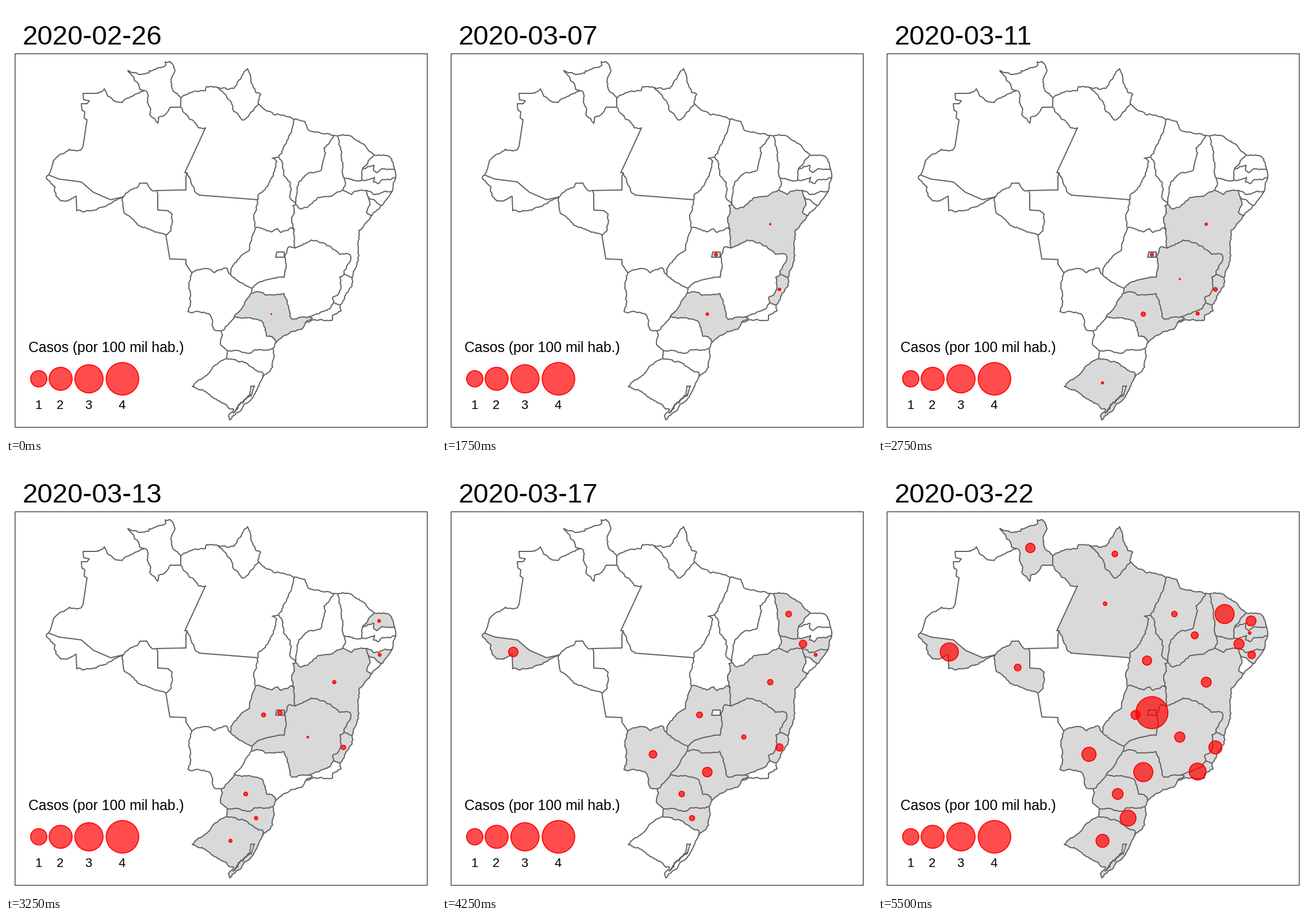
Write a matplotlib script that moves like this. It is 748 by 748 pixels and loops after 8.5 s.

```python
import math
import random

import matplotlib.pyplot as plt
import numpy as np
from matplotlib.animation import FuncAnimation
from matplotlib.collections import LineCollection
from matplotlib.patches import Circle, Polygon, Rectangle

SIZE, DPI = 748, 64
PT = 72 / DPI                # points per pixel
STEP_MS, FRAMES = 250, 34
LAST_DAY = 22
UNIT_RADIUS = 14.15          # bubble radius for one case per 100 thousand
GREY, LINE = "#d9d9d9", "#636363"
BUBBLE = dict(facecolor=(1, 0, 0, 0.7), edgecolor="red", linewidth=1.7 * PT)

fig = plt.figure(figsize=(SIZE / DPI, SIZE / DPI), dpi=DPI, facecolor="white")
ax = fig.add_axes([0, 0, 1, 1])
ax.set_xlim(0, SIZE)
ax.set_ylim(SIZE, 0)
ax.axis("off")

borders = []
states = []


def jagged(a, b, rng):
    """Fractal path from a (excluded) to b."""
    length = math.dist(a, b)
    if length < 4:
        return [b]
    off = 0.42 * rng.uniform(-1, 1) / math.sqrt(length)
    mid = ((a[0] + b[0]) / 2 - off * (b[1] - a[1]),
           (a[1] + b[1]) / 2 + off * (b[0] - a[0]))
    return jagged(a, mid, rng) + jagged(mid, b, rng)


def straight(owners, *points):
    """Border shared by the given states (one owner: outer border)."""
    borders.append((owners.split(), list(points)))


def rough(owners, *points):
    """Like straight, with a natural, jagged course between the points."""
    rng = random.Random(len(borders))
    path = [points[0]]
    for a, b in zip(points, points[1:]):
        path += jagged(a, b, rng)
    straight(owners, *path)


def ring(code):
    """Chain all borders of a state into one closed outline."""
    parts = [path for owners, path in borders if code in owners]
    outline = list(parts.pop(0))
    while parts:
        end = outline[-1]
        i = next(i for i, p in enumerate(parts) if end in (p[0], p[-1]))
        path = parts.pop(i)
        outline += path[1:] if path[0] == end else path[-2::-1]
    return outline


def radius(rate):
    return UNIT_RADIUS * math.sqrt(rate)


def state(code, center, millions, counts, gaps=()):
    """Cases grow exponentially between the given {day: count} points;
    nothing is reported before the first point or on gap days."""
    area = Polygon(ring(code), facecolor="white", edgecolor="none",
                   zorder=2 if code == "DF" else 1)
    bubble = Circle(center, 1, zorder=5, **BUBBLE)
    ax.add_patch(area)
    ax.add_patch(bubble)
    days = list(counts)
    logs = np.log(list(counts.values()))

    def cases(day):
        if day < days[0] or day in gaps:
            return 0
        return round(math.exp(np.interp(day, days, logs)))

    states.append((area, bubble, millions, cases))


def label(x, y, text, size, **kw):
    return ax.text(x, y, text, fontsize=size * PT, family="Liberation Sans",
                   va="baseline", **kw)


# North
rough("AM", (74, 294), (82, 270), (93, 259), (110, 249), (131, 250),
      (134, 244))
straight("AM", (134, 244), (141, 198), (136, 195), (137, 184), (132, 181),
         (131, 170), (141, 170), (145, 165), (135, 163), (134, 152),
         (157, 152))
rough("AM", (157, 152), (171, 144), (177, 157), (194, 167), (202, 168),
      (222, 156), (240, 147))
rough("RR", (240, 147), (232, 144), (231, 136), (219, 121), (212, 112),
      (235, 119), (248, 117), (249, 113), (278, 103), (277, 97), (286, 97),
      (294, 112), (288, 125), (290, 146), (304, 160))
rough("AM RR", (240, 147), (245, 149), (246, 168), (251, 177), (250, 188),
      (264, 204), (265, 194), (278, 188), (286, 176))
straight("AM RR", (286, 176), (304, 176))
straight("RR PA", (304, 160), (304, 176))
rough("PA", (304, 160), (321, 151), (347, 147), (349, 140), (368, 142))
rough("AP", (368, 142), (386, 145), (397, 143), (407, 128), (420, 109),
      (426, 128), (434, 150), (443, 153), (439, 170))
rough("AP PA", (439, 170), (425, 186), (416, 197), (410, 198), (403, 187),
      (396, 183), (394, 173), (382, 154), (368, 142))
rough("PA", (439, 170), (450, 180), (465, 188), (482, 190), (502, 197))
rough("PA MA", (502, 197), (495, 222), (482, 247), (480, 256), (474, 263))
rough("PA TO", (474, 263), (463, 265), (471, 270), (466, 289), (459, 306),
      (447, 322), (441, 326), (438, 337))
rough("PA MT", (315, 290), (321, 306), (328, 322), (336, 329))
straight("PA MT", (336, 329), (375, 332), (438, 337))
rough("AM PA", (304, 176), (313, 188), (335, 212), (347, 212))
straight("AM PA", (347, 212), (330, 249), (311, 290), (315, 290))
straight("AM MT", (315, 290), (313, 297), (313, 320), (262, 321))
rough("AM RO", (262, 321), (254, 321), (245, 308), (233, 308), (228, 316),
      (214, 322), (204, 332))
straight("AM AC", (74, 294), (92, 301), (131, 306), (152, 324), (182, 337),
         (204, 332))
rough("AC", (74, 294), (70, 298), (85, 314), (84, 322), (95, 339),
      (112, 337), (122, 331))
straight("AC", (122, 331), (123, 356))
rough("AC", (123, 356), (150, 356), (170, 349), (188, 339), (204, 332))
rough("RO", (204, 332), (206, 361), (229, 381), (249, 388), (278, 398))
straight("RO MT", (262, 321), (264, 327), (264, 355), (282, 356))
rough("RO MT", (282, 356), (289, 362), (287, 391), (278, 398))
rough("TO MA", (474, 263), (480, 270), (483, 292), (494, 306), (494, 334),
      (504, 345))

# Centre
straight("MT", (278, 398), (285, 440), (313, 441), (313, 449), (323, 464))
rough("MT MS", (323, 464), (352, 457), (363, 464), (384, 456), (391, 467))
rough("MT GO", (391, 467), (391, 458), (403, 441), (424, 424), (424, 414),
      (434, 386))
rough("MT TO", (434, 386), (431, 363), (438, 337))
rough("GO TO", (434, 386), (447, 388), (461, 393), (473, 388), (478, 394),
      (497, 386), (501, 391))
rough("TO BA", (504, 345), (499, 347), (502, 360), (497, 367), (501, 391))
rough("GO BA", (501, 391), (503, 421))
rough("GO MG", (503, 421), (492, 419), (488, 430), (485, 437), (487, 456),
      (484, 472), (441, 480), (428, 491))
straight("DF", (471, 428), (484, 428), (484, 437), (469, 437), (471, 428))
rough("GO MS", (391, 467), (404, 479), (428, 491))
straight("MS MG", (428, 491), (427, 499))
rough("MS SP", (427, 499), (415, 517), (397, 541))
rough("MS PR", (397, 541), (374, 565))
rough("MS", (323, 464), (318, 489), (321, 500), (317, 532), (352, 535),
      (357, 541), (361, 562), (374, 565))

# Northeast
rough("MA", (502, 197), (520, 201), (525, 215), (551, 222), (570, 225))
straight("PI", (570, 225), (577, 226))
rough("CE", (577, 226), (595, 225), (614, 235), (640, 259))
rough("RN", (640, 259), (667, 262), (676, 284))
straight("PB", (676, 284), (678, 292), (678, 299))
rough("PE", (678, 299), (672, 322))
rough("AL", (672, 322), (653, 347))
rough("SE", (653, 347), (637, 364))
rough("MA PI", (570, 225), (553, 247), (556, 256), (548, 286), (528, 290),
      (510, 305), (506, 316), (504, 345))
rough("PI CE", (577, 226), (582, 250), (588, 299))
rough("PI PE", (588, 299), (590, 312), (586, 320))
rough("CE PE", (588, 299), (620, 303))
rough("CE PB", (620, 284), (620, 303))
rough("CE RN", (640, 259), (629, 274), (620, 284))
rough("RN PB", (620, 284), (640, 277), (639, 284), (645, 290), (654, 283),
      (676, 284))
rough("PB PE", (620, 303), (630, 302), (641, 298), (639, 306), (648, 309),
      (655, 302), (678, 299))
rough("PE AL", (626, 321), (642, 328), (660, 322), (672, 322))
rough("AL BA", (626, 321), (630, 332))
rough("AL SE", (630, 332), (653, 347))
rough("SE BA", (630, 332), (633, 346), (627, 359), (637, 364))
rough("PE BA", (586, 320), (601, 328), (607, 322), (626, 321))
rough("PI BA", (504, 345), (514, 353), (526, 349), (543, 333), (566, 331),
      (586, 320))
rough("BA", (637, 364), (614, 391), (613, 420), (610, 452), (602, 472))

# Southeast
rough("MG BA", (503, 421), (531, 407), (550, 412), (580, 432), (598, 432),
      (600, 439), (593, 452), (588, 467))
rough("BA ES", (588, 467), (602, 472))
rough("MG ES", (588, 467), (581, 471), (583, 488), (577, 503), (569, 506),
      (570, 515))
rough("ES", (602, 472), (602, 487), (589, 505), (581, 520))
rough("ES RJ", (570, 515), (581, 520))
rough("MG RJ", (570, 515), (563, 527), (545, 535), (526, 541))
rough("RJ", (581, 520), (583, 530), (568, 538), (567, 547), (548, 545),
      (521, 551))
rough("RJ SP", (526, 541), (533, 543), (521, 551))
rough("SP MG", (427, 499), (446, 498), (453, 503), (483, 500), (489, 516),
      (494, 538), (498, 545), (526, 541))
rough("SP", (521, 551), (515, 562), (496, 566), (470, 585))

# South
rough("SP PR", (397, 541), (421, 542), (445, 548), (453, 574), (463, 575),
      (470, 585))
rough("PR", (374, 565), (376, 574), (373, 588), (385, 600))
rough("PR", (470, 585), (464, 596))
rough("PR SC", (385, 600), (400, 599), (424, 604), (434, 598), (464, 596))
straight("SC", (385, 600), (384, 613))
rough("SC", (464, 596), (464, 628), (446, 647))
rough("SC RS", (384, 613), (416, 620), (433, 633), (446, 637), (446, 647))
rough("RS", (384, 613), (371, 619), (339, 650), (324, 662), (341, 667),
      (362, 683), (380, 692), (388, 700), (396, 702), (387, 713), (389, 720),
      (405, 706), (423, 688), (440, 660), (446, 647))
rough("lagoon", (432, 661), (426, 661), (425, 676), (411, 691), (427, 678),
      (432, 661))
rough("lake", (409, 689), (395, 708), (403, 701), (409, 689))

ax.add_collection(LineCollection([path for _, path in borders], colors=LINE,
                                 linewidths=2 * PT, capstyle="round",
                                 joinstyle="round", zorder=4))
for name in ("lagoon", "lake"):
    ax.add_patch(Polygon(ring(name), facecolor="white", edgecolor="none",
                         zorder=3))

# Bubble centre, population in millions, growth, days without a report
state("SP", (461.5, 536), 45.92, {0: 1, 5: 6, 22: 631}, gaps=(13,))
state("RJ", (556, 535), 17.26, {5: 1, 22: 186},
      gaps=(7, 9, 10, 13, 14, 15, 17, 20))
state("ES", (587, 493), 4.02, {5: 1, 9: 1, 17: 8, 22: 26})
state("BA", (571, 379.5), 14.87, {6: 1, 22: 55}, gaps=(8,))
state("DF", (476.5, 432.5), 3.015, {7: 1, 10: 1, 13: 2, 20: 87, 22: 117},
      gaps=(17,))
state("MG", (525, 475), 21.17, {8: 1, 12: 1, 17: 14, 22: 83})
state("AL", (650, 332), 3.34, {8: 1, 17: 1, 20: 6, 22: 7}, gaps=(11,))
state("RS", (390.5, 655.5), 11.38, {10: 1, 13: 4, 20: 37, 22: 72},
      gaps=(14, 15, 17))
state("GO", (448, 436.5), 7.02, {12: 3, 20: 18, 22: 21})
state("PR", (417, 574), 11.43, {12: 6, 14: 6, 22: 50})
state("SC", (435, 616), 7.16, {12: 2, 15: 7, 17: 7, 20: 40, 22: 68})
state("PE", (628, 313), 9.557, {12: 2, 16: 18, 22: 37}, gaps=(13, 14, 15))
state("RN", (649, 273), 3.507, {13: 1, 18: 1, 20: 6, 22: 13},
      gaps=(14, 15, 17, 19))
state("MS", (367, 505), 2.78, {14: 2, 17: 6, 22: 21})
state("CE", (603, 261), 9.13, {15: 3, 17: 11, 20: 68, 22: 125})
state("SE", (637.5, 349), 2.30, {15: 1, 21: 10}, gaps=(17, 22))
state("AC", (124, 327), 0.882, {17: 3, 18: 3, 21: 11})
state("PB", (646.5, 294), 4.018, {18: 1})
state("TO", (468, 342), 1.573, {18: 1, 20: 1, 22: 5})
state("PA", (395, 243), 8.60, {18: 1, 22: 4}, gaps=(20,))
state("PI", (551, 298), 3.273, {19: 3, 20: 4, 22: 6})
state("AP", (412, 156.5), 0.846, {20: 1})
state("MA", (515.5, 261), 7.075, {20: 1, 22: 8})
state("RO", (243, 354), 1.777, {20: 1, 21: 3})
state("MT", (350, 387), 3.484, {20: 1, 21: 2}, gaps=(22,))
state("RR", (265, 146), 0.606, {21: 2})

# Frame and legend
ax.add_patch(Rectangle((15.8, 83.1), 717, 649.8, fill=False, snap=False,
                       edgecolor="#1a1a1a", linewidth=1.2 * PT))
label(39, 602, "Casos (por 100 mil hab.)", 24.7)
for value, x in zip((1, 2, 3, 4), (57, 95, 144.3, 202.6)):
    ax.add_patch(Circle((x, 648.5), radius(value), **BUBBLE))
    label(x - 0.7, 701, str(value), 22, ha="center")
title = label(28.4, 67, "", 47.4)


def date(day):
    early = ("02-26", "02-28", "02-29", "03-01", "03-04")
    return "2020-" + (early[day] if day < len(early) else f"03-{day:02d}")


def update(frame):
    day = min(frame, LAST_DAY)
    title.set_text(date(day))
    for area, bubble, millions, cases in states:
        count = cases(day)
        area.set_facecolor(GREY if count else "white")
        bubble.set_visible(count > 0)
        bubble.set_radius(radius(count / (10 * millions)))
    return []


anim = FuncAnimation(fig, update, frames=FRAMES, init_func=lambda: update(0),
                     interval=STEP_MS, repeat=True, repeat_delay=0, blit=False)
plt.show()
```
